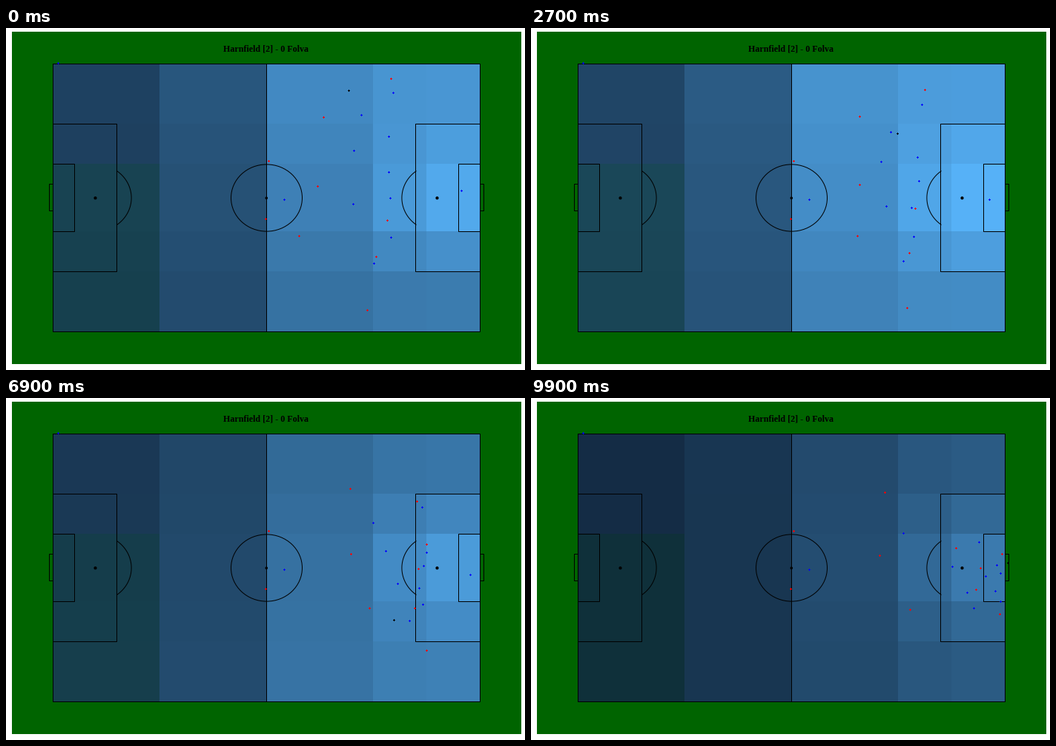
A matplotlib script for the animation above (10 s loop, 700 px wide and 461 px high).

```python
import numpy as np
import matplotlib.pyplot as plt
from matplotlib.animation import FuncAnimation
from matplotlib.collections import PolyCollection
from matplotlib.patches import Circle, Ellipse, Rectangle

W, H, DPI = 700, 461, 64
PX = 72 / DPI  # points per pixel
FRAMES = 100
MID_Y = 229

# Each run is a parabola through its start, a point at MID_TIME and its end.
MID_TIME = 0.616
CARRIER = (462, 84), (551, 190), (635, 210)
RECEIVER = (395, 280), (482, 282), (511, 285)
WINGER = (487, 380), (553, 350), (632, 291)
REDS = [
    CARRIER, RECEIVER, WINGER,
    ((519, 68), (549, 125), (573, 202)),
    ((428, 120), (460, 121), (477, 127)),
    ((420, 213), (462, 210), (470, 212)),
    ((514, 259), (546, 231), (606, 229)),
    ((499, 308), (541, 288), (600, 258)),
]
BLUES = [
    ((522, 87), (552, 137), (604, 194)),
    ((479, 117), (493, 163), (502, 182)),
    ((469, 165), (501, 201), (568, 227)),
    ((516, 146), (555, 202), (628, 225)),
    ((516, 194), (553, 222), (613, 240)),
    ((518, 229), (544, 254), (626, 260)),
    ((468, 237), (516, 248), (588, 262)),
    ((519, 282), (548, 279), (633, 274)),
    ((496, 317), (533, 304), (597, 283)),
    ((614, 219), (624, 238), (633, 236)),
]
STILL = [("red", (354, 179)), ("red", (350, 257)),
         ("blue", (70, 47)), ("blue", (375, 231))]
GOAL = 643, 222
POSSESSION = [(CARRIER, 0, 36), (RECEIVER, 46, 63), (WINGER, 79, 88)]

X_EDGES = np.array([64, 207, 351, 495, 567, 639])
Y_EDGES = np.array([49, 129, 183, 274, 328, 409])
ZONE_X = (X_EDGES[1:] + X_EDGES[:-1]) / 2
ZONE_Y = (Y_EDGES[1:] + Y_EDGES[:-1])[:, None] / 2
BRIGHT = np.array([0.18, 0.33, 0.71, 0.77, 0.77])
FADED = np.array([0.01, 0.08, 0.23, 0.32, 0.34])
LOW, HIGH = np.array([19, 43, 67]), np.array([86, 177, 247])
TEAL = np.array([-5, 4, -11])


def run(points):
    """Position in every frame, one row each."""
    a, b, c = np.polyfit([0, MID_TIME, 1], points, 2)
    t = np.linspace(0, 1, FRAMES)[:, None]
    return a * t * t + b * t + c


def ball_path():
    """Follow whoever holds the ball, with straight passes in between."""
    path = np.full((FRAMES, 2), np.nan)
    for holder, first, last in POSSESSION:
        path[first:last + 1] = run(holder)[first:last + 1]
    path[-1] = GOAL
    t = np.arange(FRAMES)
    known = ~np.isnan(path[:, 0])
    return np.column_stack([np.interp(t, t[known], col[known]) for col in path.T])


def zone_colors(n):
    """Attacking value: fades late, leans to the ball's side, peaks at goal."""
    fade = np.interp(n, [0, 22, 26, 61, 72, 79, 92], [0.2, 0.2, 0, 0, 0.6, 0.6, 1])
    lean = (MID_Y - ball[n, 1]) * (MID_Y - ZONE_Y) / 140000
    near = np.exp(-((639 - ZONE_X) / 138) ** 2 - ((MID_Y - ZONE_Y) / 85) ** 2)
    value = (BRIGHT + fade * (FADED - BRIGHT)) * (1 + lean) + 0.27 * near
    rgb = LOW + np.clip(value, 0, 1)[..., None] * (HIGH - LOW)
    rgb[2:, 0] += TEAL
    return np.clip(rgb / 255, 0, 1)


def px(u):
    return np.floor(63.3 + 4.8 * np.asarray(u)) + 0.5


def py(v):
    return np.floor(48.5 + 4.51 * np.asarray(v)) + 0.5


ball = ball_path()
runs = [("red", run(p)) for p in REDS] + [("blue", run(p)) for p in BLUES]
runs.append(("black", ball))

fig = plt.figure(figsize=(W / DPI, H / DPI), dpi=DPI, facecolor="white")
ax = fig.add_axes([0, 0, 1, 1])
ax.axis("off")
ax.add_patch(Rectangle((8, 5), 687, 448, fc="#006400", lw=0, aa=False))
mesh = ax.pcolormesh(X_EDGES, Y_EDGES, zone_colors(0), antialiased=False, zorder=1)
ax.set(xlim=(0, W), ylim=(H, 0))

PEN = dict(color="black", lw=PX, snap=False, zorder=2)


def box(u0, v0, u1, v1):
    ax.plot(px([u0, u1, u1, u0, u0]), py([v0, v0, v1, v1, v0]),
            solid_joinstyle="miter", **PEN)


def spot(x, r):
    ax.add_patch(Circle((x, MID_Y + 0.2), r, fc="black", lw=0, zorder=2))


box(0, 0, 120, 80)
arc = np.linspace(-1, 1, 60) * np.arccos(0.6)
for line, side in ((0, 1), (120, -1)):
    box(line, 18, line + 18 * side, 62)
    box(line, 30, line + 6 * side, 50)
    box(line, 36, line - side, 44)
    ax.plot(63.5 + 4.8 * (line + side * (12 + 10 * np.cos(arc))),
            MID_Y + 45.1 * np.sin(arc), **PEN)
    spot(px(line + 12 * side), 2.1)
ax.plot(px([60, 60]), py([0, 80]), **PEN)
ax.add_patch(Ellipse((351.5, MID_Y), 96, 90.2, fill=False, ec="black", lw=PX, zorder=2))
spot(351.3, 1.8)
ax.text(350.5, 31.5, "Harnfield [2] - 0 Folva", ha="center", va="baseline",
        family="Liberation Serif", weight="bold", size=12 * PX)

# Three-pixel plus sign around a pixel's top-left corner.
PLUS = np.array([(0, -1), (1, -1), (1, 0), (2, 0), (2, 1), (1, 1),
                 (1, 2), (0, 2), (0, 1), (-1, 1), (-1, 0), (0, 0)])
dots = PolyCollection([PLUS], linewidths=0, antialiaseds=False, zorder=3)
dots.set_facecolor([color for color, _ in STILL + runs])
ax.add_collection(dots, autolim=False)


def draw(n):
    spots = [pos for _, pos in STILL] + [path[n] for _, path in runs]
    dots.set_verts([np.round(pos) + PLUS for pos in spots])
    mesh.set_array(zone_colors(n))
    return mesh, dots


anim = FuncAnimation(fig, draw, frames=FRAMES, init_func=lambda: draw(0),
                     interval=100, repeat=True, repeat_delay=0, blit=False)
plt.show()
```
